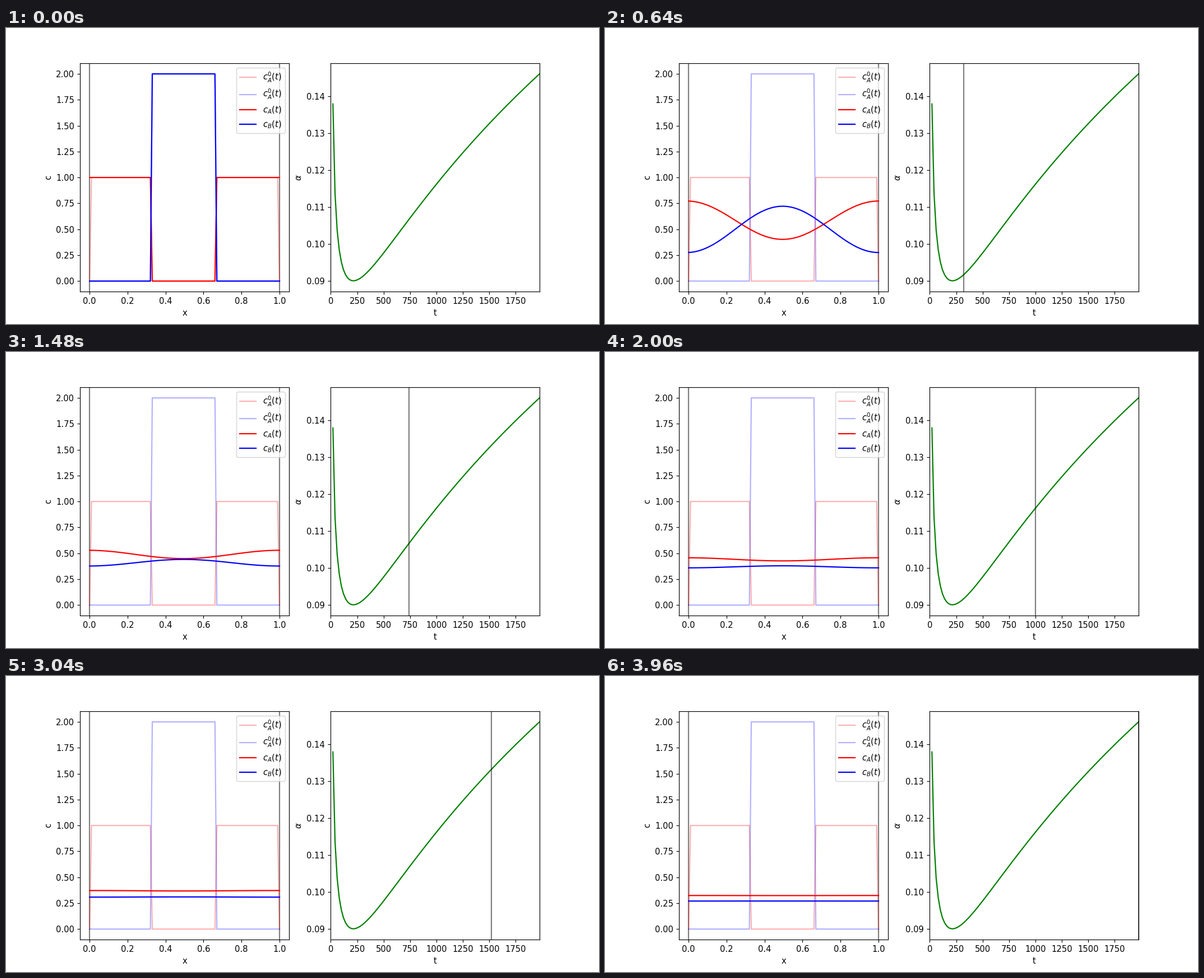
A matplotlib script that plays this animation: 1058x529 px, repeating every 4 s.

```python
import numpy as np
import matplotlib.pyplot as plt
from matplotlib.animation import FuncAnimation

FRAMES = 100
DT = 20           # model time per frame
CELLS = 101
DX = 0.01
DIFF = 1e-4
RATE = 1e-3


def diffusion_solver():
    """Matrix of one implicit diffusion step on a periodic grid."""
    eye = np.eye(CELLS)
    lap = np.roll(eye, 1, axis=0) + np.roll(eye, -1, axis=0) - 2 * eye
    return np.linalg.inv(eye - DT * DIFF / DX**2 * lap)


def simulate(a, b):
    """React explicitly, then diffuse; one state per frame."""
    solver = diffusion_solver()
    states = [(a, b)]
    for _ in range(FRAMES - 1):
        a, b = (solver @ (a - DT * RATE * a * b),
                solver @ (b - DT * RATE * b * b))
        states.append((a, b))
    return states


def alpha(t):
    """Early diffusive decay on top of a slow logarithmic rise."""
    rise = 0.0713 + 0.0978 * np.log(1 + 5.8e-4 * t)
    decay = 0.4096 * t**-0.584 * np.exp(-t / 239)
    return rise + decay


def vline(ax, pos):
    return ax.axvline(pos, color="k", alpha=0.5)


cell = np.arange(CELLS)
x = cell * DX
middle = (cell >= 33) & (cell <= 66)
a0 = np.where(middle, 0.0, 1.0)
b0 = np.where(middle, 2.0, 0.0)
states = simulate(a0, b0)
a_start = a0.copy()
a_start[[0, -1]] = 0

times = np.arange(1, FRAMES) * DT

fig, (left, right) = plt.subplots(1, 2, figsize=(10, 5), dpi=105.8)

for edge in (0, 1):
    vline(left, edge)
left.plot(x, a_start, "r", alpha=0.3, label=r"$c_A^0(t)$")
left.plot(x, b0, "b", alpha=0.3, label=r"$c_A^0(t)$")
line_a, = left.plot(x, a0, "r", label=r"$c_A(t)$")
line_b, = left.plot(x, b0, "b", label=r"$c_B(t)$")
left.set(xlabel="x", ylabel="c", xlim=(-0.05, 1.05), ylim=(-0.1, 2.1))
left.legend(loc="upper right")

right.plot(times, alpha(times), "g")
right.set(xlabel="t", ylabel=r"$\alpha$", xlim=(0, times[-1]),
          ylim=(0.08715, 0.14886))
marker = vline(right, 0)


def update(i):
    a, b = states[i]
    line_a.set_ydata(a)
    line_b.set_ydata(b)
    marker.set_xdata([i * DT, i * DT])
    return line_a, line_b, marker


anim = FuncAnimation(fig, update, frames=FRAMES, interval=40, repeat=True)
plt.show()
```
